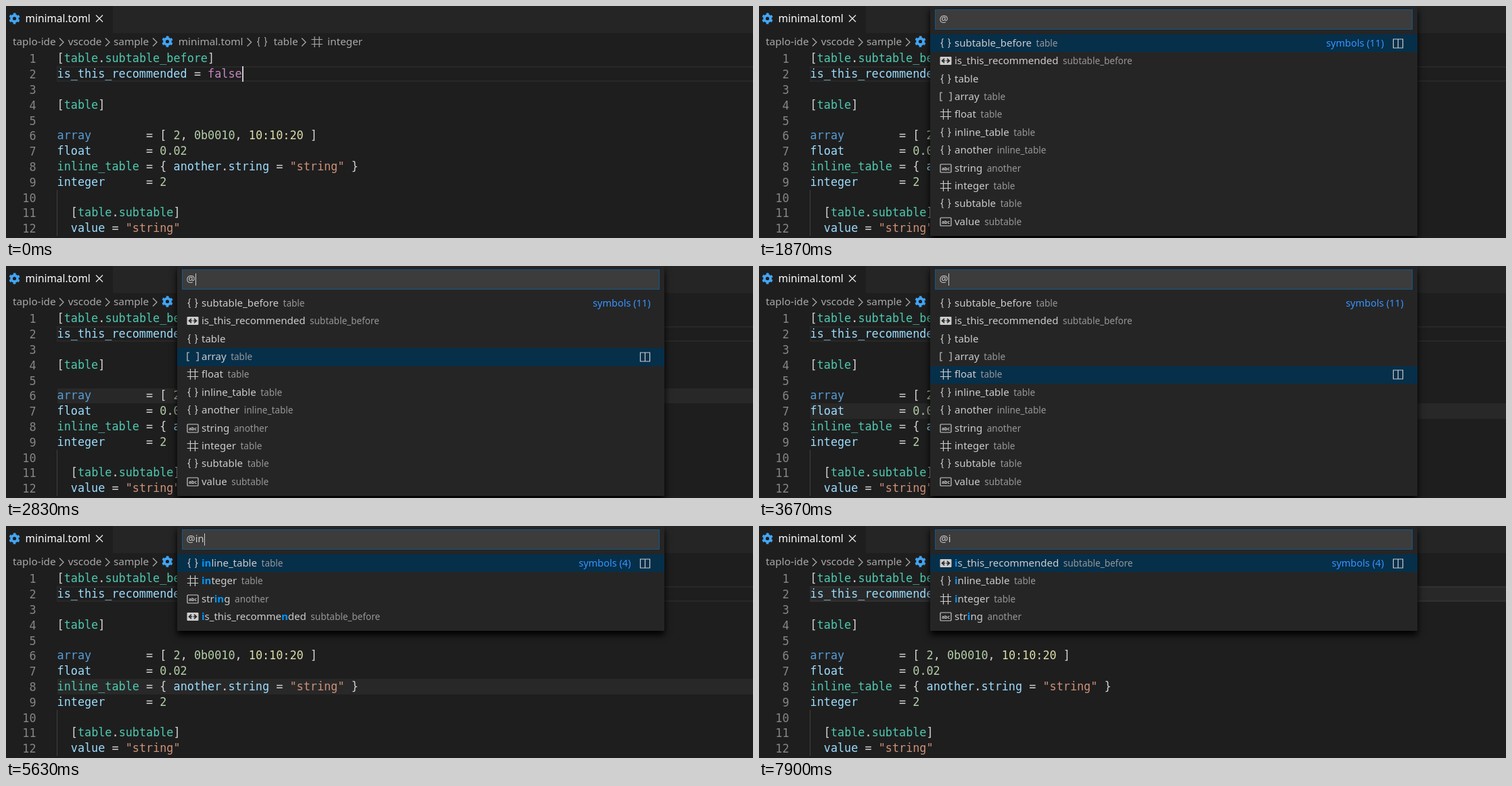
Recreate the animation shown at these times as an HTML page. Size 1104 by 343 pixels, loop 8000 ms.

```html
<!DOCTYPE html>
<html lang="en">
<head>
<meta charset="utf-8">
<title>Symbol search</title>
<style>
html, body { margin: 0; width: 100%; height: 100%; overflow: hidden; background: #1e1e1e; }
#stage { position: relative; width: 1104px; height: 343px; overflow: hidden; }
svg { position: absolute; left: 0; top: 0; width: 1104px; height: 343px; }
#panel { position: absolute; left: 253px; top: 0; width: 720px; background: #252526; box-shadow: 0 6px 9.6px #000; }
text { font-family: "Noto Sans", "Open Sans", sans-serif; }
.code { font: 16.8px "DejaVu Sans Mono", monospace; }
.num { fill: #858585; text-anchor: end; }
.p { fill: #d4d4d4; } .t { fill: #4ec9b0; } .k { fill: #9cdcfe; } .a { fill: #569cd6; }
.n { fill: #b5cea8; } .d { fill: #dcdcaa; } .s { fill: #ce9178; } .f { fill: #c586c0; }
.tab { font-size: 15.4px; fill: #fff; }
.crumb { font-size: 15.3px; fill: #a9a9a9; }
.label { font-size: 15px; fill: #ccc; }
.hit { font-weight: 700; fill: #0097fb; }
.desc { font-size: 13.5px; fill: #979797; }
.count { font-size: 14.5px; fill: #3794ff; text-anchor: end; }
.query { font-size: 14.6px; fill: #ccc; }
.abc { font-size: 7px; font-weight: 700; text-anchor: middle; stroke: none; fill: #ccc; }
</style>
</head>
<body>
<div id="stage">
  <svg id="editor"></svg>
  <div id="panel"></div>
  <svg id="list"></svg>
</div>
<script>
const LOOP = 8000, LINE = 22.8, TOP = 66.6, LEFT = 75.6, CHAR = 10.114, ROW = 26.4, LIST = 42;
const $ = id => document.getElementById(id);

// First letter of each token is its colour class.
const code = [
  ['p[', 'ttable', 'p.', 'tsubtable_before', 'p]'],
  ['kis_this_recommended', 'p = ', 'ffalse'],
  [],
  ['p[', 'ttable', 'p]'],
  [],
  ['aarray', 'p        = [ ', 'n2', 'p, ', 'n0b0010', 'p, ', 'd10:10:20', 'p ]'],
  ['kfloat', 'p        = ', 'n0.02'],
  ['tinline_table', 'p = { ', 'kanother', 'p.', 'kstring', 'p = ', 's"string"', 'p }'],
  ['kinteger', 'p      = ', 'n2'],
  [],
  ['p  [', 'ttable', 'p.', 'tsubtable', 'p]'],
  ['k  value', 'p = ', 's"string"']
];

// icon, name, parent, first line, last line
const symbols = [
  ['table', 'subtable_before', 'table', 1, 2],
  ['bool', 'is_this_recommended', 'subtable_before', 2, 2],
  ['table', 'table', '', 4, 9],
  ['array', 'array', 'table', 6, 6],
  ['num', 'float', 'table', 7, 7],
  ['table', 'inline_table', 'table', 8, 8],
  ['table', 'another', 'inline_table', 8, 8],
  ['str', 'string', 'another', 8, 8],
  ['num', 'integer', 'table', 9, 9],
  ['table', 'subtable', 'table', 11, 12],
  ['str', 'value', 'subtable', 12, 12]
];

// Each step changes part of the state at its time in ms.
const steps = [
  [0, { path: true, word: false, caret: true, open: false, query: '', row: 0, mark: false }],
  [70, { path: false }],
  [200, { word: true }],
  [430, { caret: false }],
  [1100, { caret: true }],
  [1300, { open: true }],
  [1870, { caret: false }],
  [2330, { row: 1, mark: true }],
  [2470, { caret: true }],
  [2600, { row: 2 }],
  [2830, { row: 3 }],
  [3070, { caret: false }],
  [3270, { row: 4 }],
  [3670, { caret: true }],
  [4270, { caret: false }],
  [4870, { caret: true }],
  [5400, { query: 'i', row: 0 }],
  [5630, { query: 'in' }],
  [5700, { query: 'int' }],
  [5870, { query: 'inte' }],
  [5930, { query: 'intege' }],
  [6070, { query: 'integer' }],
  [6670, { caret: false }],
  [7130, { query: 'intege' }],
  [7270, { caret: true }],
  [7330, { query: 'integ' }],
  [7470, { query: 'inte' }],
  [7600, { query: 'int' }],
  [7730, { query: 'in' }],
  [7870, { caret: false }],
  [7900, { query: 'i' }]
];

const text = (x, y, cls, body) => `<text x="${x}" y="${Math.round(y)}" class="${cls}">${body}</text>`;
const rect = (x, y, w, h, fill, more = '') =>
  `<rect x="${x}" y="${y}" width="${w}" height="${h}" fill="${fill}" ${more}/>`;
const line = (d, color, width = 1.2) => `<path d="${d}" fill="none" stroke="${color}" stroke-width="${width}"/>`;
const at = (x, y, body) => `<g transform="translate(${x} ${y})">${body}</g>`;
const lineTop = n => TOP + (n - 1) * LINE;

const brace = 'M-3.4-6.5C-5.8-6.5-5.1-4.2-5.1-2.6C-5.1-.9-6-.2-7.3 0C-6 .2-5.1.9-5.1 2.6C-5.1 4.2-5.8 6.5-3.4 6.5';
const icons = {
  table: c => line(brace, c) + `<g transform="scale(-1 1)">${line(brace, c)}</g>`,
  array: c => line('M-5-6H-8V6H-5M5-6H8V6H5', c),
  num: c => line('M-3.5-8V8M3.5-8V8M-8.2-3.5H8.2M-8.2 3.5H8.2', c),
  str: c => rect(-8, -6, 16, 12, 'none', `rx="1" stroke="${c}" stroke-width="1.2"`) +
    '<text class="abc" y="2.5">abc</text>',
  bool: c => rect(-8.5, -6, 17, 12, c, 'rx="1"') +
    line('M-2-3.2L-5.5 0L-2 3.2M-5.5 0H-.8M2-3.2L5.5 0L2 3.2M.8 0H5.5', '#252526', 1.6)
};
const split = line('M-7-6.5H7V6.5H-7ZM0-6.5V6.5', '#ccc');
const chevron = x => line(`M${x - 3} 47.5L${x + 3} 53.5L${x - 3} 59.5`, '#a9a9a9', 1.3);
const gear = '<g fill="none" stroke="#42a5f5"><circle r="4.5" stroke-width="3.8"/>' +
  '<circle r="6.9" stroke-width="2.6" stroke-dasharray="3.6 3.626" stroke-dashoffset="-1.81"/></g>';

function codeLine(tokens, i) {
  const y = 83.2 + i * LINE;
  let col = 0, out = text(44.5, y + 1.2, 'code num', i + 1);
  for (const token of tokens) {
    const body = token.slice(1), pad = body.length - body.trimStart().length;
    if (body.trim()) out += text(LEFT + (col + pad) * CHAR, y, 'code ' + token[0], body.trim());
    col += body.length;
  }
  return out;
}

const frame = rect(0, 0, 1104, 40, '#252526') + rect(0, 0, 158, 40, '#1e1e1e') +
  at(12.5, 18.5, gear) + text(28.6, 24, 'tab', 'minimal.toml') +
  line('M133 13.5L143 23.5M143 13.5L133 23.5', '#e8e8e8', 1.3) +
  text(10, 58, 'crumb', 'taplo-ide') + chevron(82) + text(91.7, 58, 'crumb', 'vscode') + chevron(150) +
  text(159, 58, 'crumb', 'sample') + chevron(220) + at(238.5, 52.5, gear) +
  text(254.8, 58, 'crumb', 'minimal.toml') + chevron(359.5);
const longPath = at(378.5, 53, icons.table('#a9a9a9')) + text(395.5, 58, 'crumb', 'table') + chevron(440) +
  at(459.5, 53, icons.num('#a9a9a9')) + text(475, 58, 'crumb', 'integer');
const codeText = code.map(codeLine).join('') + rect(75, 272, 1, 68, '#404040');

function search(query) {
  const loose = new RegExp([...query].join('.*'));
  const rank = s => s[1].startsWith(query) ? 0 : s[1].includes(query) ? 1 : 2;
  return symbols.filter(s => loose.test(s[1])).sort((a, b) => rank(a) - rank(b));
}

function label(name, query) {
  const start = Math.max(0, name.indexOf(query));
  let k = 0;
  return [...name].reduce((out, ch, i) => {
    const hit = i >= start && k < query.length && ch === query[k];
    if (hit) k++;
    return out + (hit ? `<tspan class="hit">${ch}</tspan>` : ch);
  }, '').replaceAll('</tspan><tspan class="hit">', '');
}

function drawEditor(s, picked) {
  let out = frame + (s.path ? longPath : text(368, 58, 'crumb', '...'));
  out += rect(76, 90, 1040, 21, 'none', 'stroke="#282828" stroke-width="2"');
  if (s.open && s.mark) {
    const y = Math.round(lineTop(picked[3]));
    out += rect(76, y, 1028, Math.round(lineTop(picked[4] + 1)) - y, '#fff', 'fill-opacity=".043"');
  }
  if (s.word) out += rect(297, 89, 53, 23, '#434448');
  out += codeText;
  if (!s.open && s.caret) out += rect(349, 89, 2, 23, '#c8c8c5');
  $('editor').innerHTML = out;
}

function drawRow(sym, i, s, total) {
  const [icon, name, parent] = sym, y = 54.8 + i * ROW, chosen = i === s.row;
  const top = Math.round(LIST + i * ROW), end = Math.round(LIST + (i + 1) * ROW);
  let out = chosen ? rect(253, top, 720, end - top, '#062f4a') + at(944.5, Math.round(y) + .5, split) : '';
  out += at(276, Math.round(y), icons[icon]('#ccc'));
  const desc = parent && `<tspan class="desc" dx="6.6">${parent}</tspan>`;
  out += text(289, y + 5, 'label', label(name, s.query) + desc);
  if (!i) out += text(chosen ? 923.5 : 952.5, 60, 'count', `symbols (${total})`);
  return out;
}

function drawList(s, found) {
  $('panel').style.display = $('list').style.display = s.open ? '' : 'none';
  if (!s.open) return;
  $('panel').style.height = LIST + found.length * ROW + 7.2 + 'px';
  $('list').innerHTML = rect(260.5, 5.5, 705, 29, '#3c3c3c', 'stroke="#135784"') +
    text(266.6, 24, 'query', '@' + s.query) +
    found.map((sym, i) => drawRow(sym, i, s, found.length)).join('');
  if (s.caret) {
    const x = Math.round(266.6 + $('list').querySelector('.query').getComputedTextLength());
    $('list').insertAdjacentHTML('beforeend', rect(x, 11, 1, 18, '#ccc'));
  }
}

let shown = -1;
function tick(now) {
  const t = now % LOOP;
  const step = steps.findLastIndex(([ms]) => ms <= t);
  if (step !== shown) {
    shown = step;
    const s = Object.assign({}, ...steps.slice(0, step + 1).map(([, change]) => change));
    const found = search(s.query);
    drawEditor(s, found[s.row]);
    drawList(s, found);
  }
  requestAnimationFrame(() => tick(performance.now() - start));
}
const start = performance.now();
tick(0);
</script>
</body>
</html>
```
